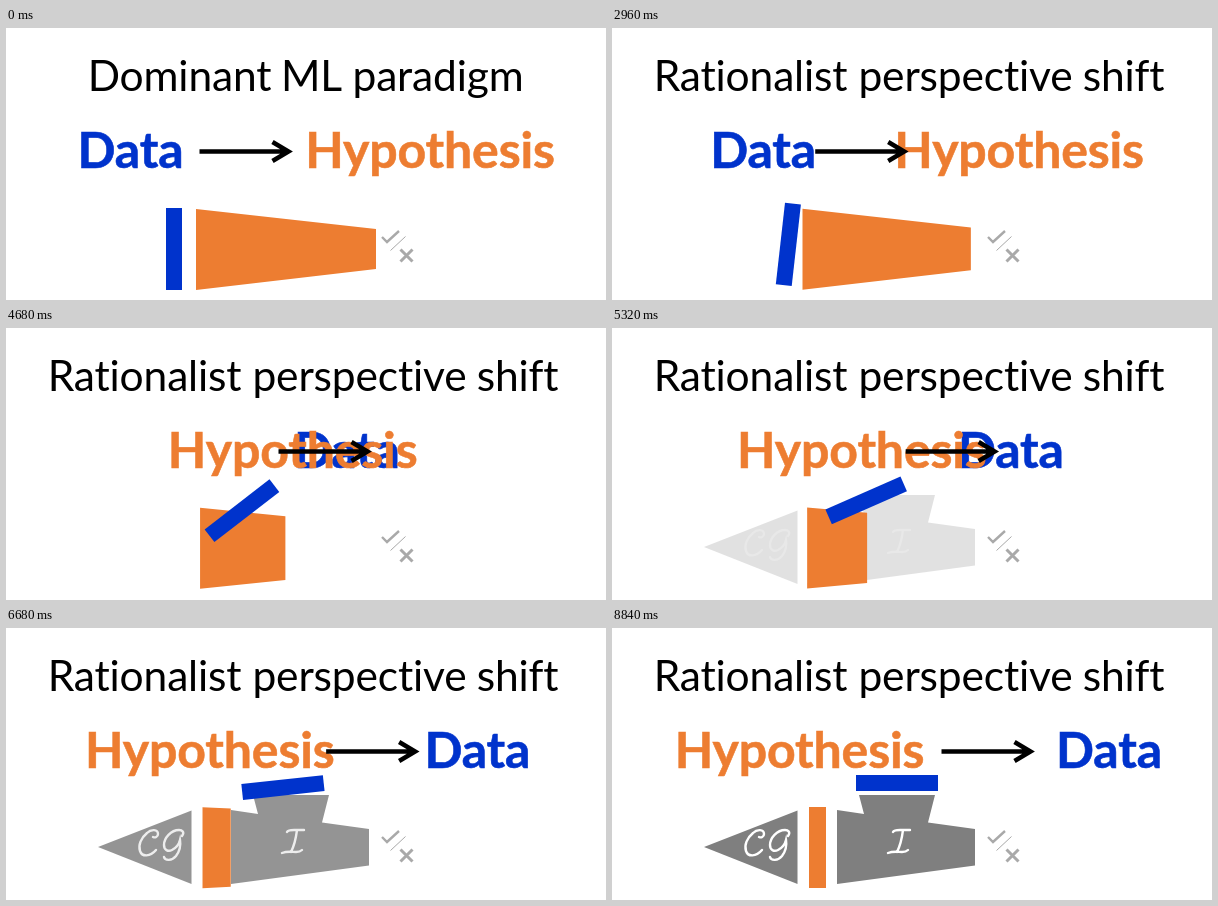
An HTML page with a canvas for the animation above (9 s loop, 600 px wide and 272 px high).

```html
<!DOCTYPE html>
<html lang="en">
<head>
<meta charset="utf-8">
<title>Rationalist perspective shift</title>
<style>
  html, body { margin: 0; width: 100%; height: 100%; overflow: hidden; background: #fff; }
  canvas { display: block; width: 600px; height: 272px; }
</style>
</head>
<body>
<canvas id="stage" width="600" height="272"></canvas>
<script>
const ctx = document.getElementById('stage').getContext('2d');
const LOOP = 9000, STEP = 40;
const BLUE = '#0033cc', ORANGE = '#ed7d31', GREY = '#7f7f7f', MARK = '#a9a9a9';
const TITLE = '400 42.5px Carlito, Lato, sans-serif';
const LABEL = '700 50px Carlito, Lato, sans-serif';

const oldTitle = [['Dominant', 173.5], ['ML', 305.5], ['paradigm', 432]];
const newTitle = [['Rationalist', 138.5], ['perspective', 353.5], ['shift', 511.5]];

const scriptC = new Path2D('M147 209c2 1 5 0 5-3c0-5-7-5-11-1c-6 5-9 12-7 18c2 6 10 6 16-1');
const scriptG = new Path2D('M176 208c3-4 0-6-3-6c-8 0-15 8-15 15c0 5 4 7 8 5c4-2 7-6 8-10c1 6-1 12-4 16c-4 5-11 5-12 1');
const scriptI = new Path2D('M281 204c1-2 4-2 7-2h10M291 202c-1 8-3 16-6 22M276 225c5-2 10-1 14-1q4 0 6-2');
const tick = new Path2D('M376 209l5 5l12-11');
const slash = new Path2D('M384.500 222.500L399.500 208.500');
const cross = new Path2D('M394.500 221.500l12 12m0-12l-12 12');

const clamp = x => Math.min(1, Math.max(0, x));
const lerp = (a, b, p) => a + (b - a) * p;

function bezierEase(x, x1, y1, x2, y2) {
  const curve = (s, a, b) => 3 * s * (1 - s) ** 2 * a + 3 * s * s * (1 - s) * b + s ** 3;
  let lo = 0, hi = 1;
  for (let i = 0; i < 24; i++) {
    const mid = (lo + hi) / 2;
    if (curve(mid, x1, x2) < x) lo = mid; else hi = mid;
  }
  return curve(lo, y1, y2);
}

function polygon(color, ...pts) {
  ctx.fillStyle = color;
  ctx.beginPath();
  for (let i = 0; i < pts.length; i += 2) ctx.lineTo(pts[i], pts[i + 1]);
  ctx.fill();
}

function stroke(path, color, width) {
  ctx.strokeStyle = color;
  ctx.lineWidth = width;
  ctx.stroke(path);
}

function text(str, x, y, font, color) {
  ctx.font = font;
  ctx.fillStyle = color;
  ctx.fillText(str, x, y);
}

function label(str, x, color) {
  text(str, x, 139.5, LABEL, color);
  ctx.strokeStyle = color;
  ctx.lineWidth = 0.6;
  ctx.strokeText(str, x, 139.5);
}

function drawEngine(alpha) {
  if (alpha <= 0) return;
  ctx.save();
  ctx.globalAlpha = alpha;
  polygon(GREY, 92, 219, 185.500, 182.500, 185.500, 256);
  polygon(GREY, 225, 182, 252, 186, 247, 167, 323, 167, 316, 194.500, 363, 201, 363, 237.500, 225, 256);
  ctx.lineCap = 'round';
  for (const glyph of [scriptC, scriptG, scriptI]) stroke(glyph, '#fff', 2.4);
  ctx.restore();
}

function drawBar(p) {
  ctx.save();
  ctx.translate(lerp(168, 285, p), lerp(221, 155, p));
  ctx.rotate(p * Math.PI / 2);
  ctx.fillStyle = BLUE;
  ctx.fillRect(-8, -41, 16, 82);
  ctx.restore();
}

function drawArrow(x) {
  const y = 123.5;
  const path = new Path2D();
  path.moveTo(x, y);
  path.lineTo(x + 89, y);
  path.moveTo(x + 73, y - 9.5);
  path.lineTo(x + 89, y);
  path.lineTo(x + 73, y + 9.5);
  stroke(path, '#000', 4.5);
}

function drawTitles(t) {
  if (t >= 1200) {
    const y = lerp(-15, 62.5, clamp((t - 1160) / 500));
    for (const [word, x] of newTitle) text(word, x, y, TITLE, '#000');
  }
  if (t > 2280) return;
  oldTitle.forEach(([word, x], i) => {
    const e = Math.max(0, t - 1200 - 60 * i) / 520;
    ctx.save();
    ctx.translate(x, 47.5 + 111 * e ** 1.54);
    ctx.rotate(17 * Math.PI / 180 * e ** 1.3);
    text(word, 0, 15, TITLE, '#000');
    ctx.restore();
  });
}

function draw(t) {
  const time = clamp((t - 2400) / 6000);
  const p = bezierEase(time, 0.27, 0.1, 0.343, 1);

  ctx.fillStyle = '#fff';
  ctx.fillRect(0, 0, 600, 272);
  ctx.textAlign = 'center';
  ctx.letterSpacing = '-0.15px'; // also turns ligatures off

  drawEngine(clamp((time - 0.4) / 0.375));
  const left = lerp(190, 197, p), right = lerp(370, 214, p);
  polygon(ORANGE,
    left, lerp(181, 179, p), right, lerp(201, 179, p),
    right, lerp(241, 260, p), left, lerp(262, 260, p));
  drawBar(p);

  stroke(tick, MARK, 2.4);
  stroke(slash, MARK, 1);
  stroke(cross, MARK, 3);

  label('Data', lerp(124.5, 497, p), BLUE);
  label('Hypothesis', lerp(424, 187.5, p), ORANGE);
  drawArrow(lerp(193.5, 329.5, p));
  drawTitles(t);
}

const start = performance.now();
function frame() {
  const t = (performance.now() - start) % LOOP;
  draw(Math.floor(t / STEP) * STEP);
  requestAnimationFrame(frame);
}
frame();
</script>
</body>
</html>
```
